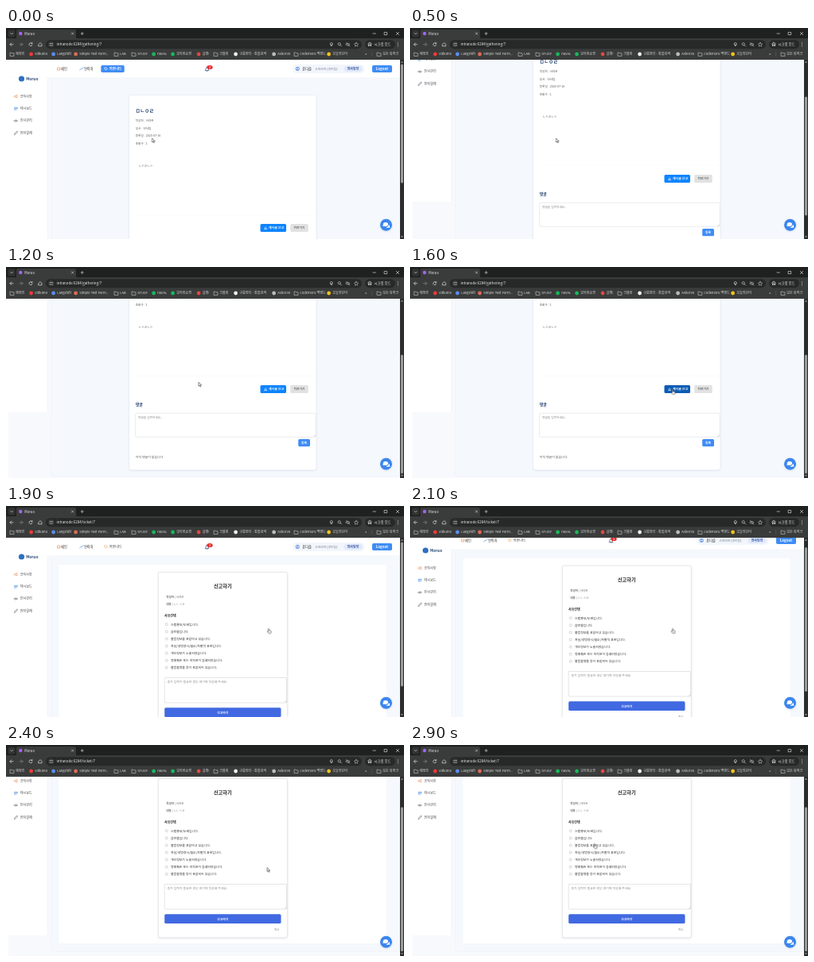
An HTML page for the animation above (3 s loop, 500 by 266 pixels).

```html
<!DOCTYPE html>
<html lang="ko">
<head>
<meta charset="utf-8">
<title>Moruo</title>
<style>
  @property --scroll { syntax: "<number>"; inherits: true; initial-value: 0; }

  html, body { margin: 0; width: 100%; height: 100%; overflow: hidden; background: #fff; }
  svg {
    display: block; width: 100%; height: 100%;
    font-family: "Noto Sans CJK KR", "Noto Sans", sans-serif;
    animation: scroll 3s -1ms infinite;
  }
  text { white-space: pre; }
  .page { transform: matrix(1, 0, 0, 1, 0, calc(var(--scroll) * -1)); }
  .post .thumb { transform: matrix(1, 0, 0, 1, 0, calc(var(--scroll) * .663)); }
  .report .thumb { transform: matrix(1, 0, 0, 1, 0, calc(var(--scroll) * .8)); }
  .post, .report, .hover, .arrow, .hand { animation: 3s step-end -1ms infinite; }
  .post { animation-name: post; }
  .report { animation-name: report; }
  .hover { animation-name: hover; }
  .arrow { animation-name: arrow; }
  .hand { animation-name: hand; }
  .cursor { animation: move 3s -1ms infinite; }

  @keyframes scroll {
    0% { --scroll: 0; animation-timing-function: step-end; }
    3.333% { --scroll: 0; animation-timing-function: steps(4); }
    16.667% { --scroll: 62; animation-timing-function: steps(3); }
    26.667% { --scroll: 96; animation-timing-function: step-end; }
    30% { --scroll: 98; animation-timing-function: step-end; }
    63.333% { --scroll: 0; animation-timing-function: step-end; }
    70% { --scroll: 8; animation-timing-function: steps(3); }
    80%, 100% { --scroll: 41; animation-timing-function: step-end; }
  }
  @keyframes move {
    0% { transform: matrix(1, 0, 0, 1, 183.5, 139); animation-timing-function: step-end; }
    33.333% { transform: matrix(1, 0, 0, 1, 183.5, 139); animation-timing-function: steps(5); }
    50% { transform: matrix(1, 0, 0, 1, 329.5, 154.5); animation-timing-function: step-end; }
    80% { transform: matrix(1, 0, 0, 1, 328, 154.5); animation-timing-function: steps(5); }
    96.667%, 100% { transform: matrix(1, 0, 0, 1, 231.5, 124.5); animation-timing-function: step-end; }
  }
  @keyframes post { 0% { visibility: visible; } 63.333%, 100% { visibility: hidden; } }
  @keyframes report { 0% { visibility: hidden; } 63.333%, 100% { visibility: visible; } }
  @keyframes hover { 0% { fill: #0d84ff; } 50%, 100% { fill: #0b5cb5; } }
  @keyframes arrow {
    0% { opacity: 1; } 50% { opacity: 0; } 73.333% { opacity: 1; } 96.667%, 100% { opacity: 0; }
  }
  @keyframes hand {
    0% { opacity: 0; } 50% { opacity: 1; } 73.333% { opacity: 0; } 96.667%, 100% { opacity: 1; }
  }
</style>
</head>
<body>
<svg id="stage" viewBox="0 0 500 266" preserveAspectRatio="none"></svg>
<script>
const BLUE = '#3f8cf5', NAVY = '#23406e', INK = '#333';

// y is the vertical middle of the line
const text = (x, y, size, str, fill = INK, extra = '') =>
  `<text x="${x}" y="${(y + size * .36).toFixed(2)}" font-size="${size}" fill="${fill}" ${extra}>${str}</text>`;
const bold = (x, y, size, str, fill, extra = '') =>
  text(x, y, size, str, fill, `font-weight="700" ${extra}`);
const mid = 'text-anchor="middle"';
const rect = (x, y, w, h, fill, r = 0, extra = '') =>
  `<rect x="${x}" y="${y}" width="${w}" height="${h}" rx="${r}" fill="${fill}" ${extra}/>`;
const dot = (x, y, r, fill, extra = '') =>
  `<circle cx="${x}" cy="${y}" r="${r}" fill="${fill}" ${extra}/>`;
const ring = (x, y, r, c, w = .6) => dot(x, y, r, 'none', `stroke="${c}" stroke-width="${w}"`);
const line = (d, stroke, w = .7) =>
  `<path d="${d}" fill="none" stroke="${stroke}" stroke-width="${w}" stroke-linecap="round" stroke-linejoin="round"/>`;
const folder = x => line(`M${x} 35v-4h1.8l.7.8h2.5v3.2z`, '#ccc', .6);
const pen = (x, y, c) => line(`M${x} ${y + 2}l.5-1.4 3-3 .9.9-3 3z`, c);

function browser() {
  const light = '#ddd';
  const marks = [
    [5, '', '예정인'], [29, '#f03a36', 'Vidlumo'], [57, '#5b8def', 'Langshift'],
    [85, '#e06a55', 'Simple Text Form...'], [136, '', 'LAB'], [158, '', 'STUDY'],
    [183, '#18b85a', 'nuVAL'], [207, '#18b85a', '모아랑쇼핑'], [239.5, '#e8453c', '살래!'],
    [261, '', '크롤링'], [286, '#eee', '구름장터 - 통합검색'], [334, '#bbb', 'AskOrvo'],
    [362, '', 'Codemoru 백엔드'], [403, '#f2c31b', '오늘의단어'], [466, '', '모든 북마크']
  ];
  return rect(0, 0, 500, 14, '#1f2020') + rect(0, 13, 500, 27, '#3a3b3b')
    + rect(2.5, 2.5, 9, 9, '#333434', 2.5) + line('M5.8 6.5l1.3 1.3 1.3-1.3', light)
    + `<path d="M11 13.5q2 0 2-2V4q0-2 2-2h71q2 0 2 2v7.5q0 2 2 2z" fill="#3a3b3b"/>`
    + dot(18.3, 7, 2.2, '#a066ee') + text(23.3, 7, 4.2, 'Moruo', '#eee')
    + line('M82.4 5.8l2.4 2.4m0-2.4l-2.4 2.4M94 7h3.4M95.7 5.3v3.4', light, .6)
    + line('M461 7h3.4M475.5 5.4h3.2v3.2h-3.2zM490.3 5.3l3.4 3.4m0-3.4l-3.4 3.4', '#eee', .6)
    + line('M9 20.7H5m1.8-1.9L5 20.7l1.8 1.9', light)
    + line('M17 20.7h4m-1.8-1.9l1.8 1.9-1.8 1.9', '#888')
    + line('M32.6 19.4a2 2 0 1 0 .4 1.8M33 18.3v1.4h-1.4', light)
    + line('M41 20.4l2-1.8 2 1.8v2.4h-4z', light)
    + rect(50, 15.2, 397, 11, '#272828', 5.5) + dot(56.8, 20.7, 3.6, '#3a3b3b')
    + line('M55 19.5h1.4m1 0h1.2M55 21.9h1.2m1 0h1.4', light, .6)
    + ring(408.8, 20, 1.5, light) + line('M407.6 21l1.2 2 1.2-2', light, .6)
    + ring(418.7, 20.2, 1.6, light) + line('M420 21.5l1.4 1.4', light)
    + line('M427 20.7q2.5-3 5 0q-2.5 3-5 0M427.5 18.4l4.2 4.6', light, .6)
    + line('M440 18.2l.8 1.7 1.8.2-1.3 1.3.3 1.8-1.6-.9-1.6.9.3-1.8-1.3-1.3 1.8-.2z', light, .5)
    + rect(451, 15.2, 38, 11, '#272828', 5.5)
    + line('M454.5 20.2h5M455.6 19.8l.4-1.5h2l.4 1.5', light, .6)
    + dot(455.8, 22, .9, light) + dot(458.2, 22, .9, light)
    + text(462.5, 20.7, 4.3, '시크릿 모드', '#eee')
    + [18.7, 20.7, 22.7].map(y => dot(492.5, y, .5, light)).join('')
    + marks.map(([x, c, name]) =>
        (c ? dot(x + 2.6, 33, 2.4, c) : folder(x)) + text(x + 7.2, 33, 4.1, name, '#ddd')).join('')
    + text(451, 32.6, 5, '»', light) + line('M459.7 30.5v5', '#666', .5);
}

const address = path => text(63.5, 20.7, 4.4, 'intranode:6284/' + path, '#eee');

function frame(active) {
  const tab = active ? '#fff' : INK;
  const items = ['공지사항', '대시보드', '인사관리', '전자결재'];
  return rect(0, 40, 495, 23, '#fff') + rect(3, 62.7, 492, .4, '#edf0f5')
    + line('M64.2 51l2-1.7 2 1.7M64.8 51v2h2.8v-2', '#f08a50')
    + text(69.2, 51.3, 4.2, '메인')
    + line('M92.5 53l1.5-1.5 1 .6 2-2.6', '#4d9be8') + text(98, 51.3, 4.2, '연락처')
    + (active ? rect(119.3, 47, 29.4, 9, BLUE, 1.8) : '')
    + line('M123.8 50.3l1.5-.8 2 2-1.8 1.3z', active ? '#fff' : '#e9a565')
    + text(129.8, 51.3, 4.1, '커뮤니티', tab, active ? 'font-weight="700"' : '')
    + line('M250.3 53.2q1-1 .9-2.3q.2-1.7 1.4-1.7t1.4 1.7q0 1.3.9 2.3zM252 54.2h1.2', '#39537c')
    + `<ellipse cx="256" cy="49.5" rx="3.7" ry="2.6" fill="#ee2a2a"/>` + bold(256, 49.5, 3.4, '3', '#fff', mid)
    + rect(360, 46, 90.5, 11, '#f2f6fc', 5.5)
    + ring(366.3, 51.4, 2.2, '#3f78d8', .7) + dot(366.3, 50.8, .8, '#3f78d8')
    + line('M365.1 52.7q1.2-.9 2.4 0', '#3f78d8')
    + text(372.3, 51.4, 4.2, '윤다솔', '#222', 'font-weight="500"')
    + text(387.8, 51.5, 3.9, 'JUNIOR (경리팀)', '#7a8494')
    + rect(424.5, 47.7, 23, 7.6, '#e1e9fb', 3.8) + bold(436, 51.5, 4, '전사담당', '#31519b', mid)
    + rect(460, 47, 25, 9, BLUE, 1.8) + bold(472.5, 51.4, 4.5, 'Logout', '#fff', mid)
    + rect(3, 63, 49.3, 218, '#fff') + rect(52, 63, .5, 218, '#e6eaf0')
    + dot(19.5, 64, 3.6, '#2f6fc0') + bold(25.2, 64.2, 4.8, 'Moruo', NAVY)
    + line('M10.5 86l3.5-1.5v3.4l-3.5-1.2z', '#ef9060')
    + line('M10.5 100.3h4M10.5 101.7h4M10.5 103.1h2.5', '#4a94e6')
    + line('M10 117q2.4-2.6 4.8 0q-2.4 2.6-4.8 0', '#7c8694') + dot(12.4, 117, .8, '#7c8694')
    + pen(10.5, 132.3, '#6b7686')
    + items.map((s, i) => text(17.8, 86.2 + i * 15.4, 4.1, s, '#444')).join('');
}

const scrollbar = h => rect(495, 40, 5, 226, '#2b2c2c')
  + `<path d="M496 43.8l1.5-2 1.5 2zM496 262.2l1.5 2 1.5-2z" fill="#999"/>`
  + rect(496, 45.5, 3, h, '#9c9d9d', 1.5, 'class="thumb"');

function post() {
  const meta = ['작성자 : 서라온', '부서 : 인사팀', '등록일 : 2025-07-16', '조회수 : 1'];
  return `<g class="post">${address('gathering/7')}<g clip-path="url(#view)"><g class="page">`
    + rect(3, 40, 492, 330, '#f8f9fd')
    + rect(57, 63, 438, 299, '#f5f8fd', 2, 'stroke="#eceff6" stroke-width=".5"')
    + frame(true)
    + rect(155, 85, 234.5, 268.5, '#fff', 3, 'filter="url(#soft)"')
    + bold(162.7, 105, 6.3, 'ㅁㄴㅇㄹ', NAVY)
    + meta.map((s, i) => text(162.8, 116.3 + i * 9.9, 3.6, s, '#555')).join('')
    + text(166.5, 174, 3.9, 'ㄴㅇㄹㄴㅇ', '#444')
    + rect(163, 235, 226, .4, '#f3f4f7')
    + rect(319.5, 247, 32.5, 10, '#0d84ff', 1.6, 'class="hover"')
    + line('M324.6 253.6h3M325.2 253.2v-1.6q.9-1.8 1.8 0v1.6', '#fff', .6)
    + bold(330, 252, 3.9, '게시글 신고', '#fff')
    + rect(357.2, 247, 22.6, 10, '#e2e2e2', 1.6) + text(368.5, 252, 3.8, '뒤로가기', INK, mid + ' font-weight="500"')
    + bold(162.7, 271, 4.9, '댓글', NAVY)
    + rect(162.7, 282.3, 226.4, 30, '#fff', 1, 'stroke="#d3d8df" stroke-width=".5"')
    + line('M386.8 311.6l1.8-1.8M387.9 311.6l.7-.7', '#888', .3)
    + text(166, 288, 3.7, '댓글을 입력하세요...', '#888')
    + rect(367.2, 315, 14.8, 9.3, BLUE, 1.6) + bold(374.6, 319.7, 3.8, '등록', '#fff', mid)
    + text(162.8, 337.2, 3.9, '아직 댓글이 없습니다.', '#555')
    + `</g></g>${scrollbar(150)}</g>`;
}

function report() {
  const reasons = [
    '스팸홍보/도배입니다.', '음란물입니다.', '불법정보를 포함하고 있습니다.',
    '욕설/생명경시/혐오/차별적 표현입니다.', '개인정보가 노출되었습니다.',
    '명예훼손 또는 저작권이 침해되었습니다.', '불법촬영물 등이 포함되어 있습니다.'
  ];
  return `<g class="report">${address('ticket/7')}<g clip-path="url(#view)"><g class="page">`
    + rect(3, 40, 492, 270, '#f8f9fd')
    + rect(57, 63, 438, 238.5, '#f5f8fd', 2, 'stroke="#eceff6" stroke-width=".5"')
    + rect(66.5, 74, 411.5, 217, '#fff', 1)
    + frame(false)
    + rect(191.3, 83.3, 162, 200.5, '#fff', 2, 'stroke="#d0d0d3" stroke-width=".5" filter="url(#soft)"')
    + bold(272.3, 101, 6.2, '신고하기', '#222', mid)
    + text(201.3, 114.7, 3.5, '<tspan font-weight="700">작성자</tspan> | 서라온', '#666')
    + text(201.3, 123.8, 3.5, '<tspan font-weight="700">내용</tspan> | ㄴㄴ ㅇㄹ', '#666')
    + bold(199, 138.3, 4, '사유선택', '#222')
    + reasons.map((s, i) => {
        const y = 149.2 + i * 9.1;
        return ring(201.8, y, 1.5, '#999', .4) + text(207, y, 3.9, s, INK, 'font-weight="500"');
      }).join('')
    + rect(199.2, 216.5, 153.3, 31.5, '#fff', .8, 'stroke="#c6c8cc" stroke-width=".5"')
    + line('M350.2 247.3l1.8-1.8M351.3 247.3l.7-.7', '#888', .3)
    + text(202.5, 221.7, 3.9, '추가 입력이 필요한 경우 여기에 작성해 주세요.', '#8a8a8a')
    + rect(199.2, 254.3, 146.3, 11.7, '#4169e1', 1.6) + bold(272.3, 260.2, 3.9, '신고하기', '#fff', mid)
    + text(337, 273.3, 3.6, '취소', '#888')
    + `</g></g>${scrollbar(182)}</g>`;
}

const chat = `<g filter="url(#soft)">${dot(477.5, 248.3, 7.5, '#3b86ee')}</g>
  <path d="M473.2 249.8l.6-1.5q-.5-3 3-3.2q3.4.2 3.3 2.6q-.4 2.4-4 2.3z" fill="#fff"/>
  <path d="M477.5 250.9q3.2-.3 3.4-3q1.7.7 1.1 2.6l.6 1.4-1.7-.3q-2.2.8-3.4-.7z" fill="#fff"/>`;

const cursor = `<g class="cursor" fill="#fff" stroke="#111" stroke-width=".5">
  <path class="arrow" d="M0 0v5l1.2-1.1.8 1.9.9-.4-.8-1.8h1.6z"/>
  <path class="hand" d="M0 .4q.6-.7 1 0v2l2 .4q.8.2.6 1.2l-.5 2h-2.5l-1.9-2.3q.1-.8 1.3.1z"/></g>`;

document.getElementById('stage').innerHTML = `<defs>
  <clipPath id="view"><rect y="40" width="495" height="226"/></clipPath>
  <filter id="soft" x="-20%" y="-20%" width="140%" height="140%">
    <feDropShadow dx="0" dy=".6" stdDeviation="1.2" flood-color="#274060" flood-opacity=".16"/>
  </filter></defs>`
  + rect(0, 40, 500, 226, '#fff') + browser() + post() + report() + chat + cursor;
</script>
</body>
</html>
```
